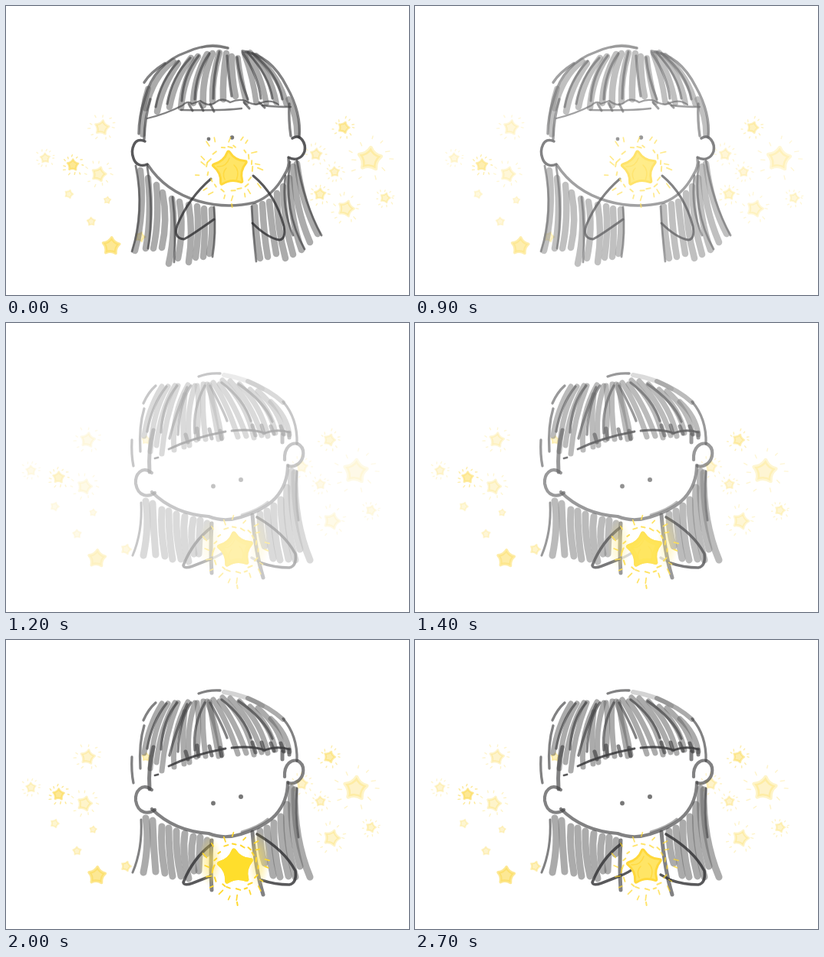
An HTML page with a canvas for the animation above (2.8 s loop, 525 by 378 pixels).

```html
<!DOCTYPE html>
<html lang="en">
<head>
<meta charset="utf-8">
<title>Star girl</title>
<style>
html, body { margin: 0; width: 100%; height: 100%; overflow: hidden; background: #fff; }
canvas { display: block; width: 525px; height: 378px; }
</style>
</head>
<body>
<canvas id="stage" width="525" height="378"></canvas>
<script>
const ctx = document.getElementById('stage').getContext('2d');
const LOOP = 2800, STEP = 100, CUT = 1200;
const INK = 'rgba(48,48,50,.8)', SOFT = 'rgba(64,64,66,.66)', HAIR = 'rgba(105,105,105,.56)';
ctx.lineCap = ctx.lineJoin = 'round';

function random(seed) {
  return () => {
    seed = (seed * 16807) % 2147483647;
    return seed / 2147483647;
  };
}

// Linear interpolation through [time, value] pairs.
function track(keys, t) {
  let i = 1;
  while (i < keys.length - 1 && t > keys[i][0]) i++;
  const [t0, v0] = keys[i - 1], [t1, v1] = keys[i];
  const k = Math.min(1, Math.max(0, (t - t0) / (t1 - t0)));
  return v0 + (v1 - v0) * k;
}

function stroke(path, width, color) {
  ctx.strokeStyle = color;
  ctx.lineWidth = width;
  for (const part of path.match(/M[^M]+/g)) ctx.stroke(new Path2D(part));
}

function dot(x, y, r) {
  ctx.fillStyle = '#777';
  ctx.beginPath();
  ctx.arc(x, y, r, 0, 7);
  ctx.fill();
}

// Plump star whose sides bend softly towards the centre.
function starPath(x, y, r, tilt) {
  const at = (i, d) => {
    const a = tilt - Math.PI / 2 + i * Math.PI / 5;
    return [x + d * Math.cos(a), y + d * Math.sin(a)];
  };
  ctx.beginPath();
  ctx.moveTo(...at(0, r));
  for (let i = 1; i < 10; i += 2) ctx.quadraticCurveTo(...at(i, r * .5), ...at(i + 1, r));
  ctx.closePath();
}

// Short dashes around a point; turn 0 points outwards, 1 runs along the ring.
function rays(x, y, near, far, count, length, turn, seed) {
  const rnd = random(seed);
  for (let i = 0; i < count; i++) {
    const a = (i + rnd() * .6) / count * Math.PI * 2;
    const d = near + rnd() * (far - near), l = length * (.35 + rnd() * .25);
    const cx = x + d * Math.cos(a), cy = y + d * Math.sin(a);
    const b = a + turn * Math.PI / 2 + rnd() * .5;
    ctx.beginPath();
    ctx.moveTo(cx - l * Math.cos(b), cy - l * Math.sin(b));
    ctx.lineTo(cx + l * Math.cos(b), cy + l * Math.sin(b));
    ctx.stroke();
  }
}

// x, y, radius, opacity
const SKY = [
  [125, 159, 10, .3], [51, 199, 7, .28], [87, 208, 8, .65], [121, 220, 10, .32],
  [82, 246, 6, .27], [132, 254, 5, .3], [111, 282, 6, .3], [137, 314, 12, .65],
  [175, 302, 7, .4], [440, 159, 8, .5], [404, 194, 8, .33], [428, 217, 7, .33],
  [474, 200, 16, .33], [443, 265, 11, .32], [494, 251, 7, .32]
];

function sky(stars, dx, dy) {
  stars.forEach(([x, y, r, opacity], i) => {
    const color = `rgba(252,220,90,${opacity})`;
    ctx.fillStyle = ctx.strokeStyle = color;
    starPath(x + dx, y + dy, r * .92, .15 + Math.sin(i * 5) * .2);
    ctx.fill();
    ctx.lineWidth = r * .32;
    ctx.stroke();
    if (r > 6 && i !== 7 && i !== 8) {
      ctx.lineWidth = 1.4;
      rays(x + dx, y + dy, r * 1.3, r * 1.8, 11, r * .28, 0, 71 + i);
    }
  });
}

function heldStar(x, y, glow, seed) {
  ctx.strokeStyle = '#ffd83a';
  ctx.fillStyle = '#ffe566';
  starPath(x, y, 21.5, -.1);
  ctx.lineWidth = 6;
  ctx.stroke();
  ctx.fill();
  stroke(`M${x - 17} ${y - 3}Q${x - 5} ${y - 2} ${x - 1} ${y - 14}M${x + 5} ${y - 5}Q${x + 13} ${y + 2} ${x + 8} ${y + 15}M${x - 7} ${y + 14}Q${x - 11} ${y + 5} ${x - 5} ${y - 1}`, 1.5, '#ffda42');
  ctx.globalAlpha = glow;
  ctx.fillStyle = ctx.strokeStyle = '#ffde2c';
  starPath(x, y, 21.5, -.1);
  ctx.lineWidth = 6;
  ctx.fill();
  ctx.stroke();
  ctx.globalAlpha = 1;
  const color = `rgba(255,216,45,${.7 + .3 * glow})`;
  stroke(`M${x + 2} ${y + 46}l.7 4`, 2, color);
  rays(x, y, 28, 31, 18, 5, 1, seed);
  ctx.lineWidth = 1.7;
  rays(x, y, 36, 44, 18, 6, 0, seed + 8);
}

function halo(x, y, rx, ry, opacity) {
  ctx.save();
  ctx.translate(x, y);
  ctx.scale(rx, ry);
  const g = ctx.createRadialGradient(0, 0, 0, 0, 0, 1);
  g.addColorStop(0, `rgba(255,226,90,${opacity})`);
  g.addColorStop(.5, `rgba(255,226,90,${opacity * .6})`);
  g.addColorStop(1, 'rgba(255,226,90,0)');
  ctx.fillStyle = g;
  ctx.fillRect(-1, -1, 2, 2);
  ctx.restore();
}

function faceRaised(glow) {
  sky([...SKY, [409, 246, 8, .38]], 0, 0);

  // fringe
  stroke('M224 75Q203 105 197 138M241 68Q220 95 213 132M250 66Q231 95 228 133M262 63Q245 95 244 127M269 62Q255 95 257 130M278 61Q268 95 269 124M287 62Q282 95 283 122M294 66Q294 95 299 118', 8.5, HAIR);
  stroke('M302 68Q305 95 313 126M311 64Q322 95 326 126M314 62Q333 90 339 127M318 61Q345 88 352 126M326 65Q357 93 365 128M218 72Q192 92 182 134M185 108Q176 135 178 168M368 122Q379 145 379 168', 7.5, HAIR);
  stroke('M225 72Q201 98 195 132M240 68Q216 93 210 128M251 65Q231 90 229 124M265 62Q247 88 246 122M278 60Q270 90 270 121M288 65Q290 95 294 118M301 67Q304 95 315 122M308 61Q329 92 332 121M315 61Q342 90 347 121M321 62Q354 88 360 122', 3.2, SOFT);
  stroke('M289 55Q262 48 236 60Q193 75 181 120Q173 145 173 167M308 59Q345 64 366 106Q385 140 382 172M180 100Q188 87 207 75M369 128Q368 150 371 170M188 122Q181 145 180 174', 3.4, SOFT);
  stroke('M255 54Q270 48 289 55', 3, 'rgba(110,110,110,.5)');
  stroke('M184 147Q209 141 230 130Q237 123 242 128L253 124Q265 133 273 126Q281 119 292 126Q303 121 312 124Q325 132 334 126Q346 122 355 129M228 136Q283 137 307 134M334 130Q350 132 371 132', 2.3, SOFT);
  stroke('M238 128L243 137M252 127L257 137M266 128L271 138M310 126L317 134M330 126L337 133', 3, SOFT);

  // long hair
  stroke('M175 215Q181 270 168 320M185 225Q190 275 182 317M196 234Q200 280 192 317M204 244Q211 280 203 316M216 252Q222 290 212 337M226 256Q232 290 224 330M238 260Q244 295 238 335M249 262Q252 295 247 329M258 265Q260 300 257 328M268 266Q270 300 265 324', 8.5, HAIR);
  stroke('M324 262Q325 300 331 330M334 259Q336 300 341 328M343 256Q347 295 352 324M353 245Q353 290 364 330M361 236Q362 285 374 325M369 225Q371 280 385 319M374 210Q377 265 396 309M379 206Q386 260 406 298', 8.5, HAIR);
  stroke('M169 209Q181 270 164 321M184 210Q193 268 185 317M217 250Q222 290 219 335M271 263Q274 298 269 328M320 262Q322 300 326 334M370 204Q361 268 389 318M379 202Q388 258 411 300M364 222Q359 265 374 300', 2.8, SOFT);

  // head and arms
  stroke('M181 177C167 170 162 188 166 199C169 209 178 210 184 207M373 173C384 166 391 180 389 190C386 199 377 203 368 198', 3.5, INK);
  stroke('M185 208Q207 242 250 255Q287 266 324 257Q348 248 362 222Q370 210 368 200', 3.5, SOFT);
  stroke('M267 226Q238 251 223 287Q218 304 232 305Q240 301 271 279M322 222Q351 246 362 288Q365 305 356 306Q340 303 321 284', 3, INK);
  dot(264, 174, 2.4);
  dot(294.5, 172, 2.7);
  heldStar(292, 213, glow, 33);
}

function faceLowered(glow) {
  sky([...SKY, [201, 159, 6, .4]], -18.5, -6);

  // fringe
  stroke('M203 83Q185 112 180 148M211 83Q191 115 188 168M220 82Q201 115 196 160M224 82Q207 125 203 171M237 81Q215 120 219 166M233 94Q229 125 232 162M246 82Q234 120 239 160M249 82Q253 115 248 153M257 80Q255 115 260 152M265 81Q270 115 277 152', 7, HAIR);
  stroke('M262 80Q275 112 281 150M270 78Q289 107 302 149M278 80Q298 105 313 148M282 75Q313 104 323 150M292 76Q320 105 333 147M304 80Q333 110 341 148M318 87Q345 113 351 144M328 89Q357 114 361 144M345 103Q366 122 369 146', 7, HAIR);
  stroke('M209 83Q190 107 184 142M223 82Q204 104 202 143M241 82Q226 103 224 146M266 82Q283 114 288 128M281 78Q310 100 319 128M303 80Q337 103 347 129M236 84Q221 119 213 151M259 82Q243 112 246 144', 3.4, SOFT);
  stroke('M284 68Q314 73 334 86', 6, 'rgba(130,130,130,.35)');
  stroke('M315 76Q345 89 361 104', 6, HAIR);
  stroke('M179 105Q185 91 195 82M251 70Q264 65 279 66M164 153Q163 172 166 187M180 112Q173 135 175 168M361 103Q380 125 379 158', 3.3, SOFT);
  stroke('M192 140Q185 167 187 195', 5, SOFT);
  stroke('M212 165Q243 150 286 142M294 141Q320 138 337 144Q353 138 369 143M194 177L198 176', 2.8, INK);
  stroke('M234 146L237 156M249 138L251 152M265 139L268 151M279 141L281 152M321 134L325 147M333 134L336 144M345 135L349 145M358 135L362 146M360 146L360 156M369 143L369 150', 5, SOFT);

  // long hair
  stroke('M182 233Q187 265 179 304M191 236Q192 270 195 303M203 244Q201 270 207 305M212 246Q212 280 217 309M222 250Q221 280 228 309M233 253Q229 280 238 312M244 257Q239 280 245 302M253 258Q252 280 251 302M262 262L261 280', 9, HAIR);
  stroke('M331 250Q331 275 337 292M340 246Q343 285 348 308M349 239Q348 275 357 310M358 231Q358 270 368 309M366 215Q363 260 377 310M372 194Q369 242 383 296M376 196Q375 260 396 310', 9, HAIR);
  stroke('M176 235Q178 273 165 304M379 194Q376 226 381 258', 3, SOFT);
  stroke('M268 262Q266 298 268 327M321 251Q325 300 335 333', 5, SOFT);

  // head and arms
  stroke('M190 196C177 186 168 198 169 210C172 228 186 228 194 222M363 179C362 161 373 156 380 158C390 163 389 177 381 184Q374 189 368 187', 4.2, SOFT);
  stroke('M190 221Q219 250 264 253Q284 261 306 254Q337 244 351 229Q367 211 367 186', 4.2, SOFT);
  stroke('M307 251Q331 243 341 234', 3, HAIR);
  stroke('M268 267Q243 286 231 317Q232 322 243 318L266 309M327 254Q363 275 377 302Q379 318 369 320Q350 320 333 314', 3.6, INK);
  // the light swallows the hands
  ctx.globalAlpha = 1 - glow;
  stroke('M266 309Q279 304 289 296M333 314L320 307', 3.4, INK);
  ctx.globalAlpha = 1;
  dot(270, 213.5, 2.9);
  dot(306, 205, 3);
  halo(266, 289, 15, 34, glow * .6);
  halo(329, 288, 14, 38, glow * .6);
  heldStar(299, 297, glow, 57);
}

const GLOW = [[0, 0], [400, 1], [500, .95], [900, .05], [1200, .6], [1400, .7], [1900, 1], [2000, 1], [2700, 0]];
const FADE_OUT = [[800, 1], [1200, 0]];
const FADE_IN = [[1200, .44], [1500, 1]];

function draw(t) {
  const raised = t < CUT;
  ctx.fillStyle = '#fff';
  ctx.fillRect(0, 0, 525, 378);
  (raised ? faceRaised : faceLowered)(track(GLOW, t));
  const veil = 1 - track(raised ? FADE_OUT : FADE_IN, t);
  ctx.fillStyle = `rgba(255,255,255,${veil})`;
  ctx.fillRect(0, 0, 525, 378);
}

const start = performance.now();
function tick() {
  const t = (performance.now() - start) % LOOP;
  draw(Math.floor(t / STEP) * STEP);
  requestAnimationFrame(tick);
}
tick();
</script>
</body>
</html>
```
